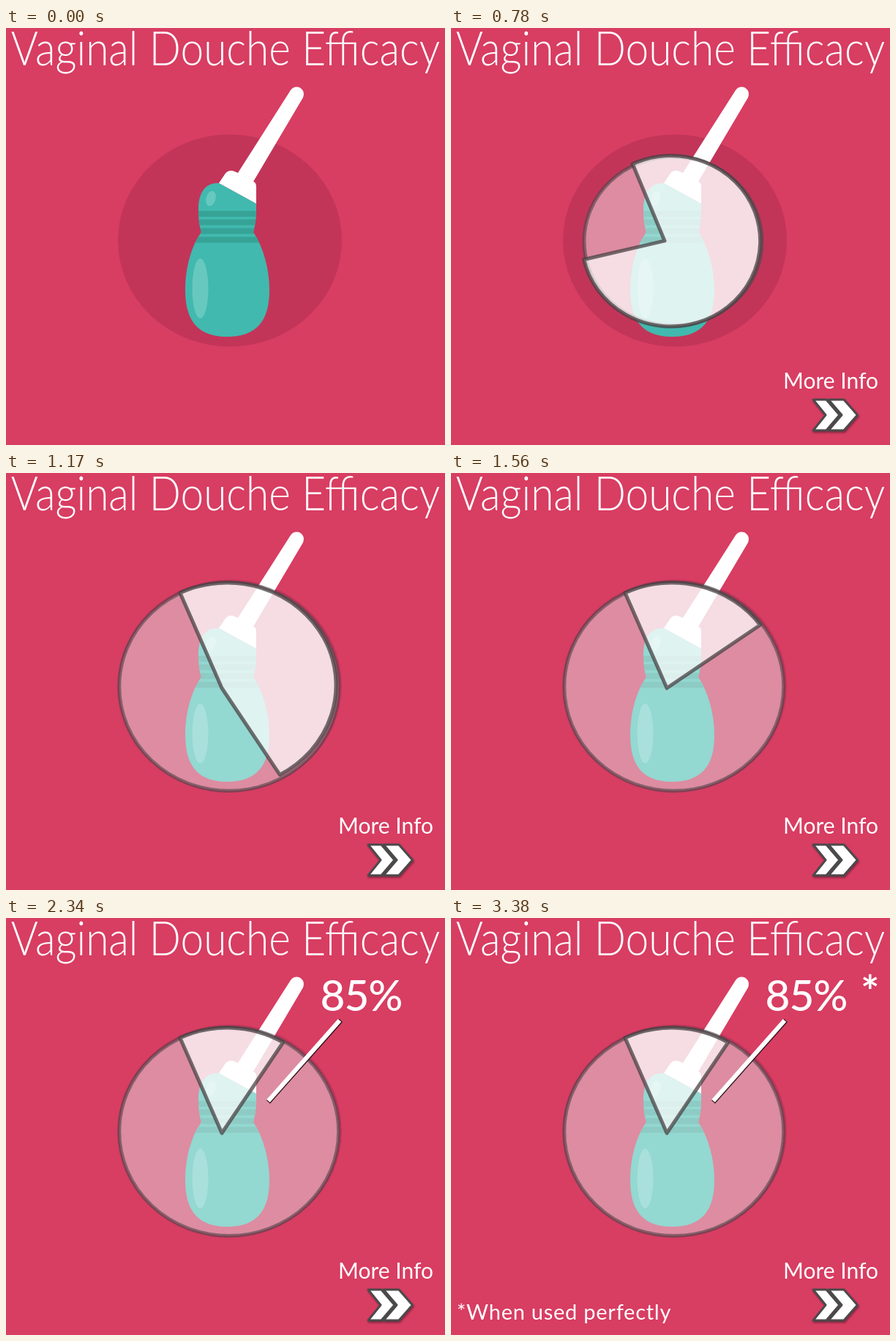
Write an HTML page that moves like this. It is 600 px wide and 570 px high and loops after 7020 ms.

```html
<!DOCTYPE html>
<html lang="en">
<head>
<meta charset="utf-8">
<title>Efficacy chart</title>
<style>
  html, body { margin: 0; width: 100%; height: 100%; overflow: hidden; background: #d83d62; }
  svg { display: block; width: 100%; height: 100%; }
  text { font-family: Lato, sans-serif; fill: #fff; }
  .title { font-size: 66px; font-weight: 300; }
  .more { font-size: 30px; }
  .percent { font-size: 58.5px; font-weight: 500; letter-spacing: -1px; }
  .star { font-size: 60px; font-weight: 700; }
  .note { font-size: 29px; letter-spacing: .75px; }
  .teal { fill: #41b9ae; }
  .glint { fill: #67c8bf; }
  .base { fill: rgba(255,255,255,.43); stroke: rgba(82,70,76,.62); stroke-width: 5; }
  .slice { fill: rgba(255,255,255,.7); stroke: rgba(72,66,69,.75); stroke-width: 5; stroke-linejoin: round; }
  .arrow { fill: #fff; stroke: #4c494b; stroke-width: 3; stroke-linejoin: round; filter: drop-shadow(1px 2px 1px rgba(60,20,35,.5)); }
</style>
</head>
<body>
<svg viewBox="0 0 600 570" preserveAspectRatio="none">
  <rect width="600" height="570" fill="#d83d62"/>
  <text class="title" transform="translate(300 51) scale(.86 1)" text-anchor="middle">Vaginal Douche Efficacy</text>
  <ellipse cx="306" cy="290.5" rx="153" ry="145" fill="#c23559"/>

  <clipPath id="bottle">
    <path id="outline" d="M263 248C263 223 274 211 291 212L342 240V250C342 262 340 272 338 279C352 300 360 330 360 358C360 400 343 422 302 422C262 422 245 400 245 358C245 330 252 300 267 279C264 270 263 260 263 248Z"/>
  </clipPath>
  <use href="#outline" class="teal"/>
  <path clip-path="url(#bottle)" d="M240 254H365M240 265.5H365M240 277.5H365M240 289.5H365" stroke="#37a397" stroke-width="8"/>
  <ellipse class="glint" cx="280" cy="233" rx="6.5" ry="10.5" transform="rotate(16 280 233)"/>
  <ellipse class="glint" cx="265.5" cy="356" rx="11" ry="41"/>
  <path fill="#fff" d="M291 212L299 200C302 195 308 194 312 196L317 198L389 85C396 75 411 83 406 95L338 210Q342 211 342 217V240Z"/>

  <ellipse class="base" id="base"/>
  <path class="slice" id="slice"/>

  <g id="pointer">
    <path d="M358.5 251.5L457.5 140" stroke="#2b1018" stroke-width="6.5"/>
    <path d="M358.5 250L456 140" stroke="#fff" stroke-width="6"/>
  </g>
  <text class="percent" id="percent" x="429.5" y="127">85%</text>
  <text class="star" id="star" x="560" y="122">*</text>
  <text class="note" id="note" x="8" y="549">*When used perfectly</text>
  <text class="more" id="more" x="454" y="492.5">More Info</text>
  <g class="arrow" id="arrow">
    <path d="M516 508H537L555.5 529L537 550H516L534 529Z"/>
    <path d="M495 508H513L531 529L513 550H495L512 529Z"/>
  </g>
</svg>
<script>
const LOOP = 7020, TICK = 130, START = 115.5;

// One value per tick; the last one holds.
const growth = [0, .02, .1, .295, .56, .81, 1];
const sweep = [0, 2, 6, 22, 48, 77, 110, 147, 183.5, 216, 249, 280.5, 303.5];
const pop = [.2, .45, .7, .953, 1.05, 1];
const pointerGrowth = [.33, .67, 1];
const percentGrowth = [.2, .4, .6, .8, 1];

const $ = id => document.getElementById(id);
const at = (table, i) => i < 0 ? 0 : table[Math.min(i, table.length - 1)];
const show = (id, on) => { $(id).style.display = on ? '' : 'none'; };

function scaleAt(id, s, x, y) {
  show(id, s > 0);
  $(id).setAttribute('transform', `translate(${x} ${y}) scale(${s}) translate(${-x} ${-y})`);
}

function setEllipse(cx, cy, rx, ry) {
  Object.entries({ cx, cy, rx, ry }).forEach(([name, v]) => $('base').setAttribute(name, v));
}

function drawPie(tick) {
  const s = at(growth, tick - 1);
  show('base', s > 0);
  show('slice', s > 0);
  if (!s) return;
  setEllipse(298 + 6.7 * s, 289 + 3 * s, 150 * s, 142.5 * s);

  const bulge = s * (1 - s);
  const rx = 149 * s + 8 * bulge, ry = 140 * s + 22 * bulge;
  const cx = 295 + 7 * s, cy = 289 + s + 9 * bulge;
  const point = deg => {
    const a = deg * Math.PI / 180;
    return `${cx + rx * Math.cos(a)} ${cy - ry * Math.sin(a)}`;
  };
  const apex = s < 1 ? `292 ${288.5 + 3 * s}` : '295 294';
  const swept = at(sweep, tick - 1);
  $('slice').setAttribute('d',
    `M${apex}L${point(START)}A${rx} ${ry} 0 ${swept < 180 ? 1 : 0} 1 ${point(START + swept)}Z`);
}

function render(time) {
  const tick = Math.floor((time % LOOP) / TICK);
  drawPie(tick);
  scaleAt('more', at(pop, tick - 1), 455, 483);
  scaleAt('arrow', at(pop, tick - 1), 525, 529);
  scaleAt('pointer', at(pointerGrowth, tick - 14), 358.5, 250);
  scaleAt('percent', at(percentGrowth, tick - 14), 485, 106);
  show('star', tick >= 22);
  show('note', tick >= 26);
}

const begin = performance.now();
function frame() {
  render(performance.now() - begin);
  requestAnimationFrame(frame);
}
frame();
</script>
</body>
</html>
```
